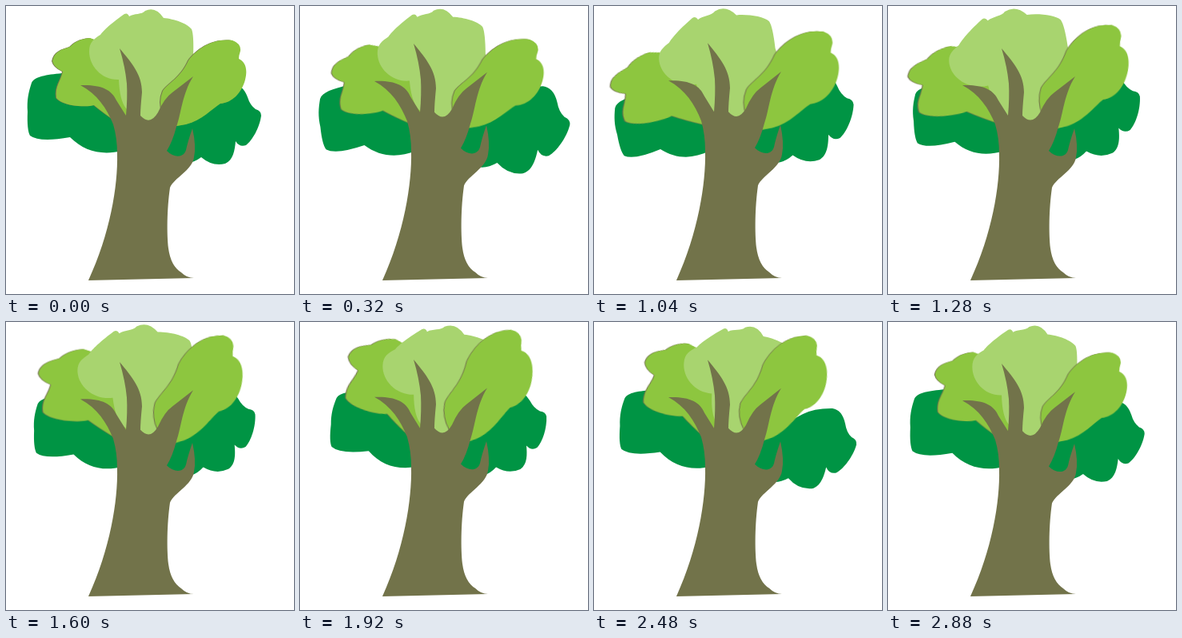
These frames come from a looping animation (360x360 px, 2960 ms). An HTML page:

```html
<!DOCTYPE html>
<html lang="en">
<head>
<meta charset="utf-8">
<title>Swaying tree</title>
<style>
  html, body { margin: 0; width: 100%; height: 100%; overflow: hidden; background: #fff; }
  svg { display: block; width: 100vw; height: 100vh; }
  path { animation: 2960ms linear infinite; }

  .dark { fill: #009444; }
  .lime { fill: #8dc63f; filter: drop-shadow(-0.2px 0.7px 0 #72734a); }
  .pale { fill: #a8d46f; }
  .bark { fill: #72734a; }

  /* Every clump swings around the point where it joins the trunk. */
  #darkLeft  { transform-origin: 145px 182px; animation-name: dark-left; }
  #darkRight { transform-origin: 205px 175px; animation-name: dark-right; }
  #limeLeft  { transform-origin: 145px 145px; animation-name: lime-left; }
  #pale      { transform-origin: 178px 144px; animation-name: pale; }
  #limeRight { transform-origin: 268px 122px; animation-name: lime-right; }
  #trunk     { transform-origin: 0 343px; animation-name: stretch; }

  @keyframes dark-left {
    0%, 100% { rotate: 0deg; scale: 1; }
    27% { rotate: -21deg; scale: 0.91; }
    43.2% { rotate: -4.3deg; scale: 0.93; }
    65% { rotate: 4deg; scale: 0.93; }
  }
  @keyframes dark-right {
    0%, 100% { rotate: 0deg; scale: 1; }
    15% { rotate: 10deg; scale: 1.17; }
    43.2% { rotate: -11deg; scale: 1.05; }
    65% { rotate: -10.5deg; scale: 0.98; }
    84% { rotate: 8.7deg; scale: 1.04; }
  }
  @keyframes lime-left {
    0%, 100% { translate: 0 0; rotate: 0deg; scale: 1 1; }
    27% { translate: -1px 2px; rotate: -21deg; scale: 1.22 1; }
    43.2% { translate: 0 0; rotate: -10deg; scale: 1.24 1; }
    70% { translate: 0 0; rotate: 15deg; scale: 1.14 1.14; }
  }
  @keyframes pale {
    0%, 100% { translate: 0 0; rotate: 0deg; scale: 1 1; }
    43.2% { translate: -1px -1px; rotate: -11deg; scale: 1.15 1.01; }
    75% { translate: 4px 1px; rotate: 8deg; scale: 1.05 1; }
  }
  @keyframes lime-right {
    0%, 100% { translate: 0 0; rotate: 0deg; scale: 1 1; }
    27% { translate: 4px 6px; rotate: 3deg; scale: 1.15 1.12; }
    43.2% { translate: 1px -5px; rotate: -3deg; scale: 1.06 1.17; }
    75% { translate: -8px -20px; rotate: -12.5deg; scale: 1.12 1.23; }
  }
  @keyframes stretch {
    0%, 43.2%, 100% { scale: 1 1; }
    26% { scale: 1 1.05; }
    75% { scale: 1 1.031; }
  }
</style>
</head>
<body>
<svg viewBox="0 0 360 360">
  <path id="darkLeft" class="dark" d="M70 84C50 86 36 88 32 96C28 108 26 118 27 132Q26 155 30 162Q42 171 80 164C98 182 120 187 145 181L150 110Z"/>
  <path id="darkRight" class="dark" d="M250 110Q262 101 284 98Q296 98 302 114Q305 124 312 129Q319 131 319 137C317 152 308 168 300 174Q292 177 287 169C286 180 284 193 274 197Q258 201 244 189Q236 195 228 196L200 195L195 150Z"/>
  <path id="limeLeft" class="lime" d="M105 40C92 41 85 46 80 51C70 54 60 57 58 69Q60 77 71 82C68 95 61 100 63 115Q70 123 90 125Q104 126 110 124Q122 134 140 146L152 139L160 60Z"/>
  <path id="pale" class="pale" d="M104 57C104 45 110 41 118 36C121 32 128 24 148 10Q152 8 154 13C160 9 170 11 174 6Q187 0 197 15C210 16 227 22 232 29Q235 36 234 63L238 90L200 130Q190 148 178 148L165 142L150 128Q142 118 141 92C120 93 104 75 104 57Z"/>
  <path id="limeRight" class="lime" d="M228 68C240 52 260 40 283 43Q294 47 293 56Q291 62 291 66C300 70 302 80 299 92C295 108 283 121 268 122C258 128 245 143 225 148L208 151L196 135Q190 120 196 106C204 95 218 90 228 68Z"/>
  <path id="trunk" class="bark" d="M103 343C130 285 140 225 139 185Q139 165 134 148C126 128 114 110 93 99C118 98 132 104 138 118L150 137Q152 115 151 97Q149 76 142 53C158 72 170 86 170 108Q168 128 168 137Q180 150 190 133Q198 115 208 108L234 88C220 110 219 135 213 151Q208 170 201 181C210 190 222 190 225 180Q227 170 233 153Q238 175 235 189C233 205 210 215 205 227C201 255 201 285 203 303Q206 325 219 333Q226 340 235 340Z"/>
</svg>
<script>
// Move all sways together in even steps.
const STEP = 80;
const sways = document.getAnimations();
sways.forEach(sway => sway.pause());

let start;
function tick(now) {
  start ??= now;
  const time = Math.floor((now - start) / STEP) * STEP;
  for (const sway of sways) sway.currentTime = time;
  requestAnimationFrame(tick);
}
requestAnimationFrame(tick);
</script>
</body>
</html>
```
